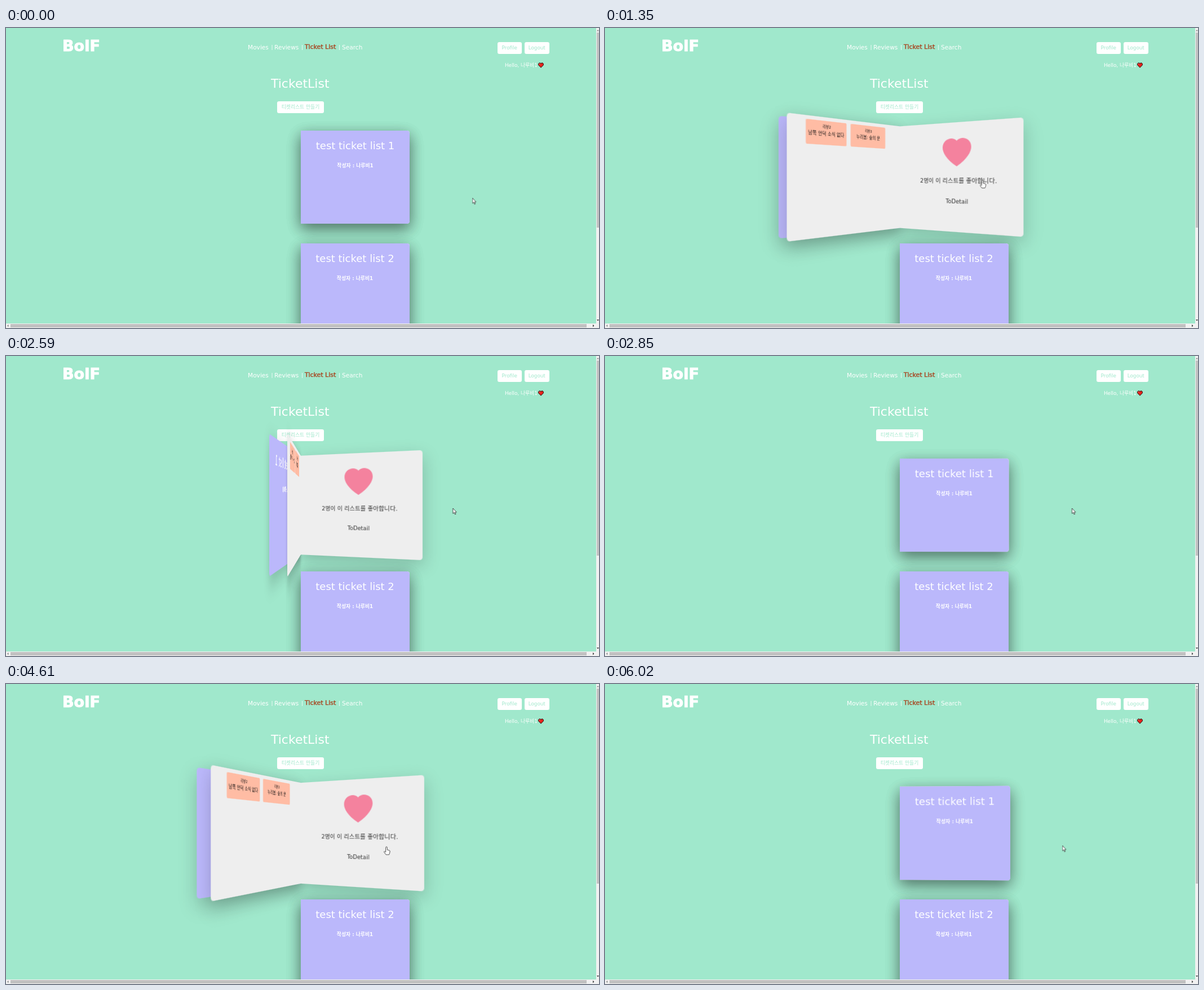
An HTML page for the animation above (6090 ms loop, 1052x532 px).

```html
<!DOCTYPE html>
<html lang="ko">
<head>
<meta charset="utf-8">
<title>Ticket List</title>
<style>
  :root { --ground: #a0e8cc; --lilac: #bbb8fb; --paper: #eee; --loop: 6090ms; }
  html, body { margin: 0; width: 100%; height: 100%; overflow: hidden; }
  body {
    position: relative;
    background: var(--ground);
    color: #fff;
    font: 8.8px/12px "DejaVu Sans", "Noto Sans CJK KR", "Noto Sans CJK", sans-serif;
  }
  .stage { position: absolute; left: 0; top: 0; width: 1052px; height: 532px; overflow: hidden; }
  .stage *, .stage { box-sizing: border-box; }
  .at, .mid, .btn, .book, .leaves, .leaf, .back, .ticket, .bar, .bar i, svg { position: absolute; }
  .at, .mid { white-space: nowrap; }
  .mid { left: 0; width: 100%; text-align: center; }

  .logo { left: 100px; top: 26px; font-weight: 700; font-size: 27px; -webkit-text-stroke: 1px #fff; }
  .nav { top: 28px; font-size: 10.6px; }
  .here { color: #a8441f; font-size: 11px; -webkit-text-stroke: .4px #a8441f; }
  .sep { font-size: 9px; }
  .btn {
    height: 21px;
    border-radius: 3.3px;
    background: #fff;
    color: var(--ground);
    line-height: 21px;
    text-align: center;
    white-space: nowrap;
  }

  .book {
    left: 522.5px;
    width: 193px;
    height: 165px;
    perspective: 657.6px;
    perspective-origin: 0 50%;
  }
  .leaves { inset: 0; transform-style: preserve-3d; }
  .leaf {
    inset: 0;
    border-radius: 0 4.4px 4.4px 0;
    background: var(--paper);
    color: #333;
    box-shadow: 0 8.8px 26.3px rgba(0, 0, 0, .2);
    transform-origin: 0 50%;
  }
  .cover { background: var(--lilac); color: #fff; }
  .cover .name { top: 20.5px; font-size: 18px; }
  .cover .by { top: 55.5px; font-weight: 700; }
  .back { inset: 0; transform: scaleX(-1); }

  .live .leaf { animation: open var(--loop) ease-in-out infinite; }
  .live .right { --turn: -30deg; }
  .live .left { --turn: -150deg; }
  .live .cover { --turn: -160deg; }
  @keyframes open {
    0%, 15.6%, 46.96%, 69.7%, 99.67%, 100% { transform: rotateY(0deg) scale(1); }
    23.81%, 38.75%, 77.91%, 91.46% { transform: rotateY(var(--turn)) scale(1.1); }
  }

  .ticket {
    top: 5px;
    width: 65.7px;
    height: 33.4px;
    border: dotted var(--paper);
    border-width: 0 1.8px;
    border-radius: 2px;
    background: #ffbca4;
    color: #111;
  }
  .ticket .no { top: 1.8px; font-size: 5.4px; }
  .ticket .film { top: 12.3px; font-size: 6.8px; }

  .bar { background: #f1f1f1; }
  .bar i { background: #c1c1c1; }

  .pointer { position: absolute; left: 0; top: 0; animation: roam var(--loop) linear infinite; }
  .pointer svg { left: 0; top: 0; overflow: visible; fill: #fff; stroke: #222; stroke-width: .8; stroke-linejoin: round; }
  .arrow { animation: arrow var(--loop) step-end infinite; }
  .hand { animation: hand var(--loop) step-end infinite; }
  @keyframes roam {
    0% { transform: translate(827.5px, 301.5px); }
    1.1%, 3.33% { transform: translate(826px, 300.5px); }
    9.85%, 12.07% { transform: translate(751.5px, 262.5px); }
    15.6% { transform: translate(715px, 266px); }
    18.88% { transform: translate(664.5px, 270px); }
    22.17%, 34.48% { transform: translate(669.5px, 270px); }
    38.75% { transform: translate(742px, 270px); }
    44.66%, 64.37% { transform: translate(828.5px, 270px); }
    69.7% { transform: translate(715px, 281px); }
    75.7% { transform: translate(674px, 289px); }
    79.15%, 87.77% { transform: translate(680.5px, 289px); }
    91.46% { transform: translate(742px, 288px); }
    97.7%, 100% { transform: translate(811.5px, 286.5px); }
  }
  @keyframes arrow {
    0%, 38.75%, 91.46%, 100% { visibility: visible; }
    15.6%, 69.7% { visibility: hidden; }
  }
  @keyframes hand {
    0%, 38.75%, 91.46%, 100% { visibility: hidden; }
    15.6%, 69.7% { visibility: visible; }
  }
</style>
</head>
<body>
<div class="stage">
  <div class="at logo">BolF</div>

  <div class="at nav" style="left:429px">Movies</div>
  <div class="at nav sep" style="left:470.5px">|</div>
  <div class="at nav" style="left:476px">Reviews</div>
  <div class="at nav sep" style="left:524px">|</div>
  <div class="at nav here" style="left:530px">Ticket List</div>
  <div class="at nav sep" style="left:590px">|</div>
  <div class="at nav" style="left:596px">Search</div>

  <div class="btn" style="left:872px;top:25px;width:42.5px">Profile</div>
  <div class="btn" style="left:920px;top:25px;width:43.5px">Logout</div>
  <div class="at" style="left:885px;top:60px">Hello, 나루비1</div>
  <svg style="left:944px;top:61px" width="10" height="10" viewBox="0 0 10 10">
    <path d="M5 9.2 1 5.2Q-.2 3 1.4 1.4 3.4 0 5 2 6.6 0 8.6 1.4 10.2 3 9 5.2Z" fill="#e8231c" stroke="#201010"/>
    <path d="M2.4 2.7h1" stroke="#fff" stroke-width=".8"/>
  </svg>

  <div class="at" style="left:470px;top:93px;font-size:22px">TicketList</div>
  <div class="btn" style="left:481px;top:130px;width:83px">티켓리스트 만들기</div>

  <div class="book live" style="top:182px">
    <div class="leaves">
      <div class="leaf right">
        <svg style="left:74px;top:24px" width="45" height="45" viewBox="0 0 16 16">
          <path fill="#f4829e" d="M8 1.3C12.4-3.2 23.5 4.7 8 15-7.5 4.7 3.6-3.2 8 1.3z"/>
        </svg>
        <div class="mid" style="top:82.4px;font-size:9.3px">2명이 이 리스트를 좋아합니다.</div>
        <div class="mid" style="top:113.3px">ToDetail</div>
      </div>
      <div class="leaf left">
        <div class="back">
          <div class="ticket" style="left:25.5px">
            <div class="mid no">리뷰2</div>
            <div class="mid film">남쪽 언덕 소식 없다</div>
          </div>
          <div class="ticket" style="left:97px">
            <div class="mid no">리뷰3</div>
            <div class="mid film">누리봄: 숲의 문</div>
          </div>
        </div>
      </div>
      <div class="leaf cover">
        <div class="mid name">test ticket list 1</div>
        <div class="mid by">작성자 : 나루비1</div>
      </div>
    </div>
  </div>

  <div class="book" style="top:382px">
    <div class="leaves">
      <div class="leaf"></div>
      <div class="leaf"></div>
      <div class="leaf cover">
        <div class="mid name">test ticket list 2</div>
        <div class="mid by">작성자 : 나루비1</div>
      </div>
    </div>
  </div>

  <div class="bar" style="left:1047px;top:0;width:5px;height:532px">
    <i style="left:1px;top:8px;width:4px;height:346px"></i>
  </div>
  <div class="bar" style="left:0;top:523.5px;width:1047px;height:8.5px">
    <i style="left:8px;top:1px;width:1022px;height:6.5px"></i>
  </div>
  <svg width="1052" height="532" style="left:0;top:0">
    <path fill="#8a8a8a" d="M4.5 525.8v4.4l-2.5-2.2zM1048 5.5h4l-2-2.5z"/>
    <path fill="#404040" d="M1041 525.8v4.4l2.5-2.2zM1048 517h4l-2 2.5z"/>
  </svg>

  <div class="pointer">
    <svg class="arrow" width="8" height="12"><path d="M0 0V9.4L2.2 7.5 3.7 10.9 5.1 10.3 3.7 7H6.4Z"/></svg>
    <svg class="hand" width="10" height="14"><path d="M-1.3 9V1.2a1.3 1.3 0 0 1 2.6 0V5.2l4 1.2q1 .4 .9 1.6l-.7 3.6-1 2.2H-.9L-4.2 9.4q-.6-1.2 .6-1.4 1 0 2.3 1.6"/></svg>
  </div>
</div>
<script>
  // The keyframes are shown in 90 even steps per loop.
  const loop = 6090, step = loop / 90, slack = 5;
  const anims = document.getAnimations();
  const start = performance.now();

  function show(t) {
    const held = Math.floor((t + slack) / step) * step % loop;
    for (const a of anims) a.currentTime = held;
  }

  function tick() {
    show((performance.now() - start) % loop);
    requestAnimationFrame(tick);
  }

  for (const a of anims) a.pause();
  tick();
</script>
</body>
</html>
```
